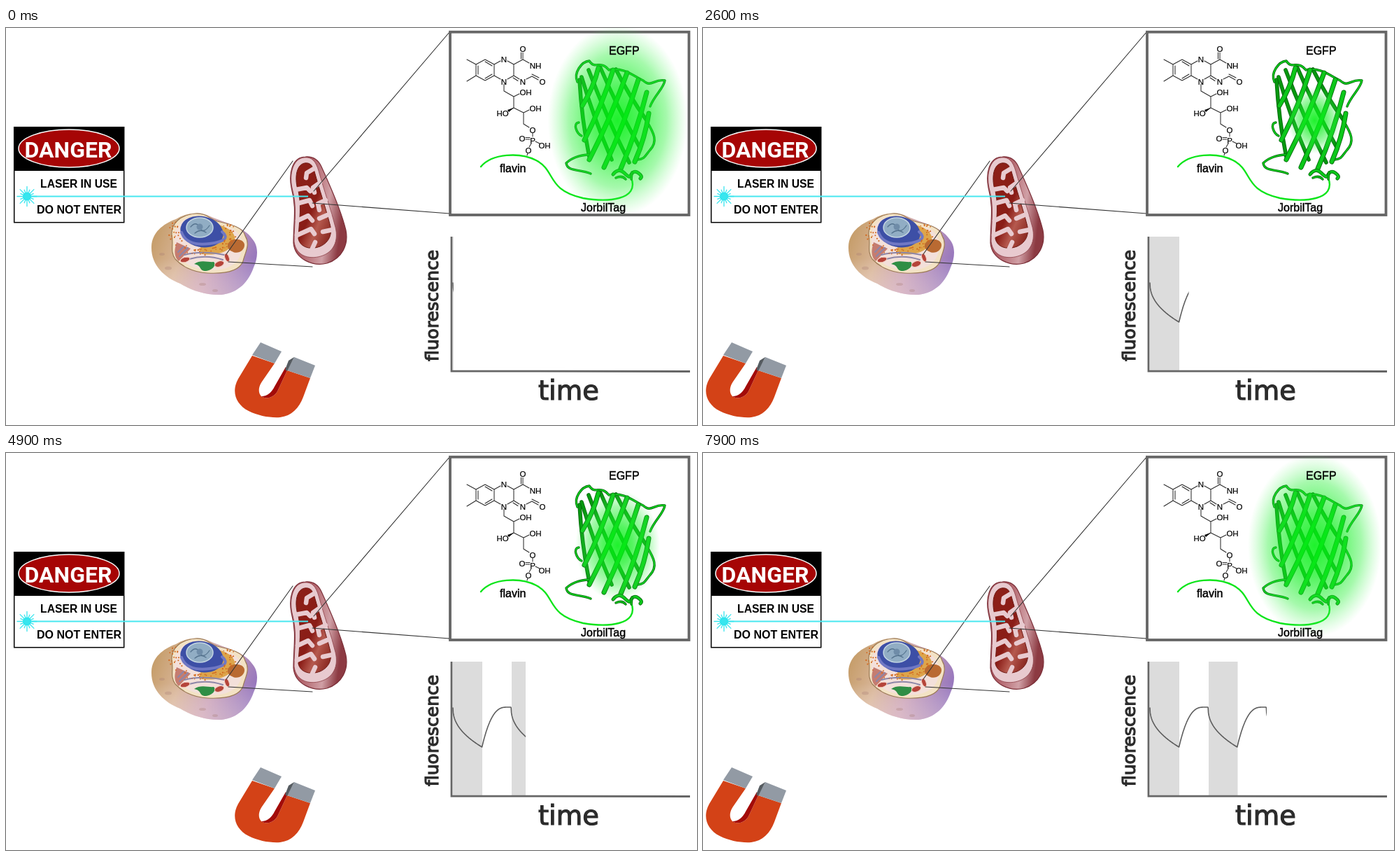
These frames come from a looping animation (988 px wide and 567 px high, 8 s). An HTML page:

```html
<!DOCTYPE html>
<html lang="en">
<head>
<meta charset="utf-8">
<title>Magnetic fluorescence</title>
<style>
  html, body { margin: 0; width: 100%; height: 100%; overflow: hidden; background: #fff; }
  svg { display: block; width: 988px; height: 567px; }
  text { font-family: "Liberation Sans", Arial, sans-serif; }
  .wide { font-family: "DejaVu Sans", Verdana, sans-serif; fill: #2b2b2b; stroke: #2b2b2b; stroke-width: 1.2; }
  .bold { font-weight: bold; text-anchor: middle; }
  .danger { font-family: Roboto, "Liberation Sans", sans-serif; font-size: 32px; fill: #fff; }
  .label { font-size: 16px; stroke: #000; stroke-width: .45; }
  .atoms { font-size: 11.5px; text-anchor: middle; stroke: #000; stroke-width: .2; }
  .line { fill: none; stroke-linecap: round; stroke-linejoin: round; }
</style>
</head>
<body>
<svg viewBox="0 0 988 567">
  <defs>
    <radialGradient id="glowFill">
      <stop offset="0" stop-color="#00f010" stop-opacity=".88"/>
      <stop offset=".35" stop-color="#0cf01c" stop-opacity=".7"/>
      <stop offset=".7" stop-color="#20f030" stop-opacity=".4"/>
      <stop offset="1" stop-color="#50f560" stop-opacity="0"/>
    </radialGradient>
    <linearGradient id="cellFill" x1="0" y1=".2" x2="1" y2=".5">
      <stop offset="0" stop-color="#c39a64"/>
      <stop offset=".35" stop-color="#d9b69a"/>
      <stop offset=".65" stop-color="#c9a0b8"/>
      <stop offset="1" stop-color="#9878bd"/>
    </linearGradient>
    <linearGradient id="cellShade" x1="0" y1="0" x2="0" y2="1">
      <stop offset=".55" stop-color="#fff" stop-opacity="0"/>
      <stop offset="1" stop-color="#f4dcd8" stop-opacity=".45"/>
    </linearGradient>
    <linearGradient id="mitoSide" x1="0" y1="0" x2="1" y2=".25">
      <stop offset=".3" stop-color="#a85058"/>
      <stop offset=".75" stop-color="#d0a0a6"/>
      <stop offset="1" stop-color="#8c3a42"/>
    </linearGradient>
    <linearGradient id="mitoCore" x1="0" y1="0" x2="1" y2="1">
      <stop offset="0" stop-color="#8d2018"/>
      <stop offset=".5" stop-color="#8a1d17"/>
      <stop offset=".68" stop-color="#b5594e"/>
      <stop offset="1" stop-color="#7c1812"/>
    </linearGradient>
    <path id="cellBody" d="M208 312C209 292 224 280 243 273C258 263 279 262 292 269C312 278 341 284 352 301C362 312 360 329 354 342C347 362 333 378 308 381C284 382 264 374 249 365C226 356 207 338 208 312Z"/>
    <clipPath id="reveal"><rect id="revealBox" x="630" y="290" width="10" height="205"/></clipPath>
  </defs>

  <!-- warning sign -->
  <rect x="11.700" y="141.700" width="157" height="136" fill="#fff" stroke="#000" stroke-width="1.500"/>
  <rect x="11" y="141" width="158" height="63"/>
  <ellipse cx="90" cy="172" rx="72" ry="27" fill="#a60505" stroke="#fff" stroke-width="1.500"/>
  <text class="bold danger" x="89" y="185">DANGER</text>
  <text class="bold" x="104" y="228" font-size="15.700">LASER IN USE</text>
  <text class="bold" x="104.500" y="265" font-size="16">DO NOT ENTER</text>

  <!-- cell -->
  <use href="#cellBody" fill="url(#cellFill)"/>
  <use href="#cellBody" fill="url(#cellShade)"/>
  <path d="M237 296C236 278 250 267 271 265C287 264 291 273 302 276C321 280 340 285 342 297C350 310 341 322 339 333C333 349 308 351 288 350C266 349 250 339 242 330C234 319 240 309 237 296Z" fill="#f3e2c4" stroke="#9b7a55" stroke-width="1.200"/>
  <path d="M241 298C241 282 254 270 272 269C291 270 299 281 315 284C334 288 340 303 337 318C333 341 309 348 287 345C262 344 238 329 241 298Z" fill="#f3e0da"/>
  <path d="M286 280C306 278 330 288 327 304C321 320 300 327 276 322Z" fill="#dda54b"/>
  <path d="M244 306L264 315L247 333C239 326 241 315 244 306Z" fill="#c57c70"/>
  <path class="line" d="M246 320L254 312M248 326L260 314M255 324Q282 317 317 325M262 330Q286 323 310 331" stroke="#8d86a8" stroke-width="2"/>
  <ellipse cx="280" cy="291" rx="31" ry="22" transform="rotate(12 280 291)" fill="#3d4fa6"/>
  <path class="line" d="M251 292Q258 312 291 308T309 291" stroke="#7078c4" stroke-width="4"/>
  <ellipse cx="277" cy="285" rx="19" ry="14" fill="#91adc4" stroke="#c3d5e2" stroke-width="1.500"/>
  <path class="line" d="M264 284Q272 275 277 285T291 282M270 293Q278 286 286 292" stroke="#56748f" stroke-width="1.300"/>
  <circle cx="277" cy="284" r="4.500" fill="#6f8ca8"/>
  <path d="M319 306C324 299 341 301 341 310C341 318 331 324 323 319C317 317 315 310 319 306Z" fill="#b96a32"/>
  <path d="M269 337C278 330 290 335 297 334C302 339 294 347 284 347C276 346 280 339 269 337Z" fill="#2f8e45"/>
  <g fill="#b5443a" stroke="#f3cdc2">
    <ellipse cx="256" cy="331" rx="7" ry="3.500" transform="rotate(-15 256 331)"/>
    <ellipse cx="305" cy="337" rx="7" ry="4" transform="rotate(-20 305 337)"/>
    <ellipse cx="316" cy="328" rx="3" ry="6" transform="rotate(-20 316 328)"/>
  </g>
  <g id="dots" fill="#d2691e"/>
  <g fill="#a77c74" opacity=".3">
    <ellipse cx="223" cy="323" rx="4" ry="2"/><ellipse cx="232" cy="343" rx="5" ry="2.500"/>
    <ellipse cx="281" cy="366" rx="5" ry="2"/><ellipse cx="299" cy="375" rx="4" ry="2"/>
  </g>

  <!-- mitochondrion -->
  <path d="M428 184C409 184 404 208 408 228C416 258 411 275 411 307C413 331 440 341 459 336C481 329 490 309 486 289C479 260 463 225 451 198C446 187 438 183 428 184Z" fill="url(#mitoSide)" stroke="#7b2f38" stroke-width="1.200"/>
  <path d="M427 185C410 186 405 209 409 228C417 258 412 276 412 305C415 328 437 331 453 325C471 318 476 300 470 281C464 257 455 233 447 204C443 190 437 184 427 185Z" fill="#e8cacf" stroke="#8f4249" stroke-width=".800"/>
  <path d="M427 193C416 195 413 211 416 226C424 250 419 276 418 301C421 314 436 317 449 312C463 306 467 293 463 280C457 257 448 230 441 205C438 195 434 192 427 193Z" fill="url(#mitoCore)" stroke="#6d1812"/>
  <path class="line" stroke="#e8cacf" stroke-width="6.500" d="M440 201L430 207L429 214M414 231L430 228L435 233M449 221L439 228L441 235M419 250L434 246L438 254M457 246L446 251L448 260M417 275L432 268L438 275M462 266L448 272M416 296L436 287L441 294M467 288L453 291M437 317L442 306"/>

  <!-- callouts and beam -->
  <path class="line" d="M315 323L410 190M318 334L438 341M440 233L634 6M438 250L634 265" stroke="#333" stroke-width="1.100"/>
  <path d="M30 240.500H432" stroke="#48e8f0" stroke-width="1.800"/>
  <circle cx="30" cy="240.500" r="6" fill="#17e7ef"/>
  <path id="rays" class="line" stroke="#38e5ee" stroke-width="1.300"/>

  <!-- magnet -->
  <g id="magnet">
    <path d="M352 468L332 501C322 519 328 537 347 547C361 554 378 557 392 556C408 554 419 543 425 527L435 500L402 489L389 517C384 528 372 531 365 526C360 521 361 512 366 505L384 479Z" fill="#d34217"/>
    <path d="M402 489L389 517C384 528 372 531 365 526C374 526 380 520 384 512L400 484Z" fill="#a30b08"/>
    <path d="M364 449L394 462L384 479L352 467Z" fill="#929aa4"/>
    <path d="M412 470L442 482L435 500L402 489Z" fill="#929aa4"/>
    <path d="M412 470L404 475L399 488L402 490Z" fill="#555b60"/>
  </g>

  <!-- detail panel -->
  <rect x="635" y="5.700" width="341.500" height="261.300" fill="#fff" stroke="#666" stroke-width="3.800"/>
  <path class="line" stroke="#2c2c2c" stroke-width="1.050" d="M659 45L672 52L685 45L698 52V68L685 75L672 68V52M659 76L672 68M675 54V66M685 48L695 54M685 72L695 66
    M698 52L707 47M717 47L726 52V68L717 73M698 68L707 73M726 52L739 45V35M736.500 44V35M739 45L748 50M726 68L734 73M725 71L732 75.500M744 73L752 69L761 74M752 66L762 71
    M712 80V90L726 98L734 94M726 98V114L718 118M726 114L740 121L748 117M740 121V137L748 142M753 150V155M749 159H743M749 156.500H743M757 162L763 165M751 165L748 170M746 179L745 182"/>
  <path d="M726 114L717 117L719 120Z"/>
  <g id="atoms" class="atoms"></g>
  <path class="line" d="M679 198C695 179 735 177 758 189C787 204 772 231 825 243C860 249 906 246 894 214" stroke="#0ce51a" stroke-width="2.400"/>
  <g id="protein" class="line"></g>
  <ellipse id="glow" cx="874.500" cy="132" fill="url(#glowFill)"/>
  <text class="label" x="706" y="206">flavin</text>
  <text class="label" x="862" y="38">EGFP</text>
  <text class="label" x="822" y="262">JorbilTag</text>

  <!-- chart -->
  <g clip-path="url(#reveal)">
    <path d="M639 298H681V489H639ZM723 298H764.500V489H723Z" fill="#dcdcdc"/>
    <path id="curve" class="line" stroke="#5c5c5c" stroke-width="1.600"/>
  </g>
  <path d="M637 298V490L978 490.500" fill="none" stroke="#666" stroke-width="2.800"/>
  <text class="wide" font-size="25" transform="translate(617.500 476) rotate(-90)">fluorescence</text>
  <text class="wide" x="761" y="531" font-size="38.500">time</text>
</svg>
<script>
  const $ = id => document.getElementById(id);

  function add(parent, tag, attrs, text) {
    const node = document.createElementNS("http://www.w3.org/2000/svg", tag);
    for (const key in attrs) node.setAttribute(key, attrs[key]);
    if (text) node.textContent = text;
    parent.append(node);
  }

  let seed = 11;
  const random = () => (seed = seed * 16807 % 2147483647) / 2147483647;

  // Granules around the nucleus
  for (let i = 0; i < 75; i++) {
    const a = -0.5 + random() * 4.2, r = 1 + random() * .42;
    add($("dots"), "circle", {
      cx: 281 + Math.cos(a) * 34 * r, cy: 293 + Math.sin(a) * 22 * r, r: .7 + random() * .5
    });
  }

  let rays = "";
  for (let i = 0; i < 16; i++) {
    const a = i * Math.PI / 8, r = i % 2 ? 10 : 14;
    rays += `M30 240.5l${Math.cos(a) * r} ${Math.sin(a) * r}`;
  }
  $("rays").setAttribute("d", rays);

  const atoms = [
    ["N", 712, 45], ["O", 739, 30], ["NH", 757, 54], ["N", 739, 77], ["O", 767, 77],
    ["N", 712, 77], ["OH", 743, 92], ["HO", 710, 122], ["OH", 757, 115], ["O", 753, 146],
    ["O", 738, 158], ["P", 753, 161], ["OH", 770, 168], ["O", 747, 175]
  ];
  for (const [name, x, y] of atoms) add($("atoms"), "text", { x, y: y + 4 }, name);

  function ribbon(d, width, color) {
    add($("protein"), "path", { d, stroke: "#056b0d", "stroke-width": width });
    add($("protein"), "path", { d, stroke: color, "stroke-width": width - 1.8 });
  }

  const strand = (x1, y1, x2, y2, bend) =>
    `M${x1} ${y1}Q${(x1 + x2) / 2 + bend} ${(y1 + y2) / 2} ${x2} ${y2}`;

  // Far side of the barrel, then loops, then near side
  [[820, 74, 834, 184], [823, 70, 866, 188], [833, 60, 891, 192], [850, 57, 907, 172], [872, 59, 916, 132]]
    .forEach(p => ribbon(strand(...p, -4), 5.6, "#06980f"));
  [
    "M817 77C811 64 823 48 834 47C842 60 850 45 862 60C882 55 898 69 911 75C923 86 926 72 942 75C940 87 927 96 921 112",
    "M834 181C819 181 807 187 801 193C803 206 821 201 836 208",
    "M819 135C810 136 816 151 823 154M916 133C927 151 932 162 921 174C914 182 914 187 903 188"
  ].forEach(d => ribbon(d, 3.4, "#0cd61c"));
  [[847, 57, 824, 111], [868, 60, 827, 160], [888, 64, 834, 188], [904, 74, 855, 199], [916, 92, 879, 201], [919, 122, 899, 191]]
    .forEach(p => ribbon(strand(...p, 5), 7, "#0cc81a"));
  ribbon("M868 209Q876 199 884 207T893 211Q897 202 904 207T907 215", 5, "#0cc81a");
  ribbon("M872 214Q881 210 886 216M894 216L895 206", 3.5, "#0cc81a");

  // Fluorescence falls with the field on and recovers with it off
  const HALF = 41.6;
  function level(x) {
    const u = x % (2 * HALF);
    if (u < HALF) return 364 + 56 * (u / HALF) ** .45;
    return 363 + 57 * Math.max(0, 1 - (u - HALF) / 36) ** 2.7;
  }
  let curve = "M639 364";
  for (let x = 0; x < HALF * 4.5; x += .4) curve += `L${(639 + x).toFixed(1)} ${level(x).toFixed(1)}`;
  $("curve").setAttribute("d", curve);

  const start = performance.now();
  function draw() {
    const t = Math.floor((performance.now() - start) % 8000 / 100) / 10;
    const phase = t % 4;
    const dim = phase < 2 ? phase : 4 - phase;
    $("glow").setAttribute("rx", 100 - 44 * dim);
    $("glow").setAttribute("ry", 137 - 64 * dim);
    $("magnet").setAttribute("transform", `translate(${phase < 2 ? 0 : -323} 0)`);
    $("revealBox").setAttribute("width", 9.8 + 21.05 * t);
    requestAnimationFrame(draw);
  }
  draw();
</script>
</body>
</html>
```
